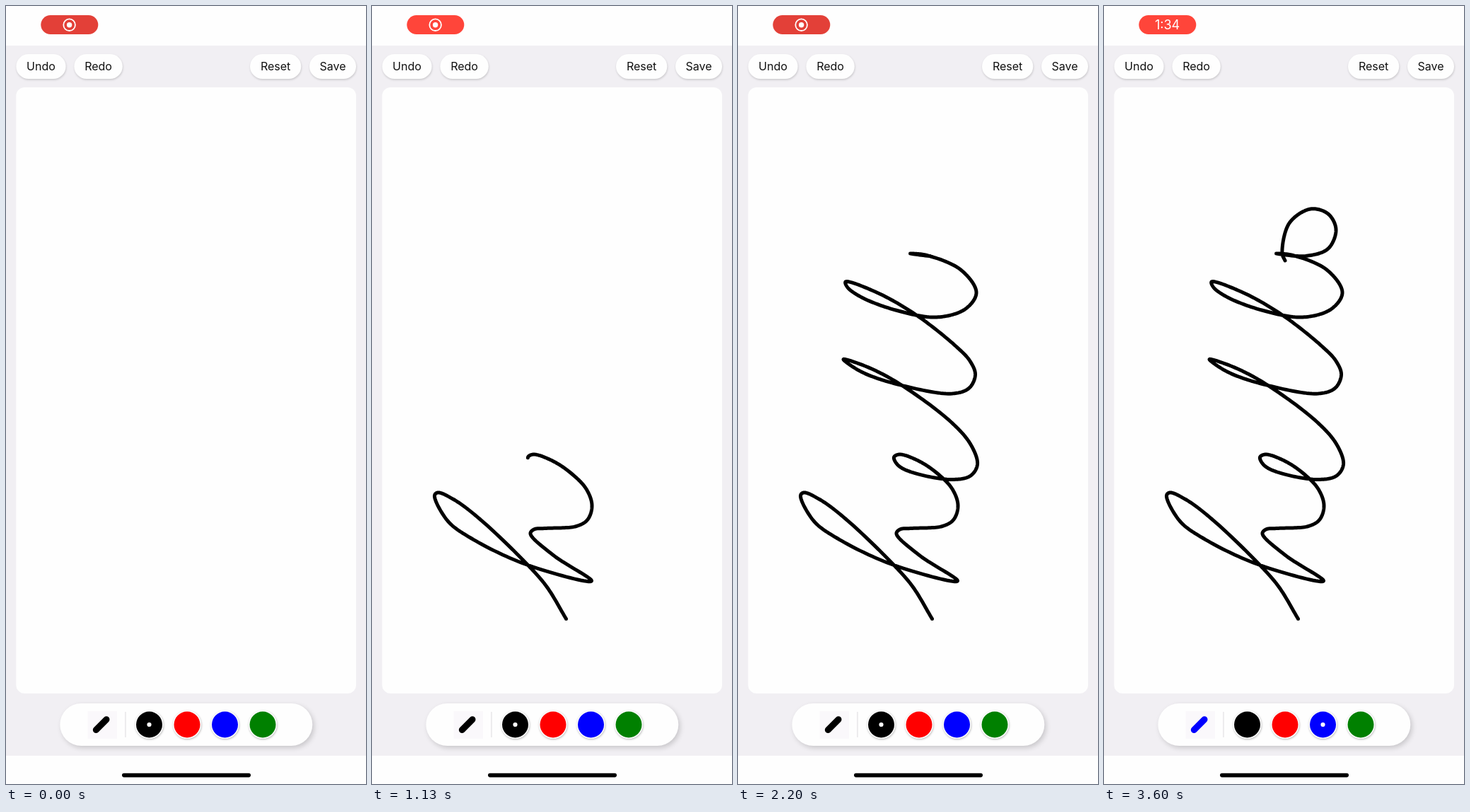
An HTML page with a canvas for the animation above (3.77 s loop, 509 by 1100 pixels).

```html
<!DOCTYPE html>
<html lang="en">
<head>
<meta charset="utf-8">
<title>Drawing pad</title>
<style>
  html, body { margin: 0; width: 100%; height: 100%; overflow: hidden; background: #fefefe; }
  canvas { display: block; width: 509px; height: 1100px; }
</style>
</head>
<body>
<canvas id="stage"></canvas>
<script>
const W = 509, H = 1100, LOOP = 3770;
const FONT = 'Inter, Roboto, sans-serif';
const canvas = document.getElementById('stage');
const ctx = canvas.getContext('2d');
const dpr = window.devicePixelRatio || 1;
canvas.width = W * dpr;
canvas.height = H * dpr;

// Pen positions per letter; a third value is the time the pen passes there.
const PEN_DOWN = 70;
const letterH = [
  [274.5, 866.5, 330], [247, 821], [219, 789], [152, 725], [116, 698], [93, 688],
  [88.5, 692], [107, 728], [141, 753, 600], [219, 790], [310.5, 813, 730],
  [257, 777], [224, 746, 835], [229, 740], [245, 738.5], [289, 735.5], [305, 726]
];
const letterE = [
  [311, 706], [303, 683], [282, 661], [255, 643], [228, 634], [220.5, 638, 1130],
  [226, 649], [245, 659], [303, 669.5], [329, 664]
];
const firstL = [
  [338.5, 648, 1300], [329, 620], [301, 588], [228, 534], [182, 510], [149, 499.5],
  [174, 517], [226, 535], [303, 548], [327, 540]
];
const secondL = [
  [335.5, 521], [328, 502], [308, 481], [250, 435.5], [194, 404], [152, 390],
  [155, 398], [175, 412], [223, 430], [281, 440, 1900]
];
const letterO = [
  [322, 428], [337, 405], [315, 373], [265, 352], [243.5, 350], [285, 353.5],
  [317, 343], [328, 316], [317, 294], [292, 287], [262, 307], [252, 350], [256, 360, 2510]
];
const PEN = [...letterH, ...letterE, ...firstL, ...secondL, ...letterO]
  .map(([x, y, t]) => ({ x, y, t }));

// Centripetal spline through the pen positions, timed by arc length.
function traceInk() {
  const n = PEN.length;
  const mirror = (a, b) => ({ x: 2 * a.x - b.x, y: 2 * a.y - b.y });
  const gap = (a, b) => Math.sqrt(Math.hypot(b.x - a.x, b.y - a.y));
  const ink = [PEN[0]];
  let part = [], len = 0, from = PEN[0].t;
  for (let i = 0; i < n - 1; i++) {
    const b = PEN[i], c = PEN[i + 1];
    const a = PEN[i - 1] || mirror(b, c), d = PEN[i + 2] || mirror(c, b);
    const ab = gap(a, b), bc = gap(b, c), cd = gap(c, d);
    const at = (k, u) => {
      const m1 = bc * ((b[k] - a[k]) / ab - (c[k] - a[k]) / (ab + bc)) + c[k] - b[k];
      const m2 = c[k] - b[k] + bc * ((d[k] - c[k]) / cd - (d[k] - b[k]) / (bc + cd));
      const s = c[k] - b[k];
      return b[k] + u * (m1 + u * (3 * s - 2 * m1 - m2 + u * (m1 + m2 - 2 * s)));
    };
    let last = b;
    for (let j = 1; j <= 20; j++) {
      const q = { x: at('x', j / 20), y: at('y', j / 20) };
      len += Math.hypot(q.x - last.x, q.y - last.y);
      q.len = len;
      part.push(q);
      last = q;
    }
    if (c.t) {
      for (const q of part) q.t = from + (c.t - from) * q.len / len;
      ink.push(...part);
      part = [];
      len = 0;
      from = c.t;
    }
  }
  return ink;
}
const INK = traceInk();

const ramp = (t, a, b) => {
  const u = Math.min(1, Math.max(0, (t - a) / (b - a)));
  return u * u * (3 - 2 * u);
};

function shadow(color, blur, dx, dy) {
  ctx.shadowColor = color;
  ctx.shadowBlur = blur * dpr;
  ctx.shadowOffsetX = dx * dpr;
  ctx.shadowOffsetY = dy * dpr;
}
const noShadow = () => shadow('transparent', 0, 0, 0);

function box(x, y, w, h, r, fill) {
  ctx.fillStyle = fill;
  ctx.beginPath();
  ctx.roundRect(x, y, w, h, r);
  ctx.fill();
}

function disc(x, y, r, fill) {
  ctx.fillStyle = fill;
  ctx.beginPath();
  ctx.arc(x, y, r, 0, Math.PI * 2);
  ctx.fill();
}

function line(x1, y1, x2, y2, width, color) {
  ctx.strokeStyle = color;
  ctx.lineWidth = width;
  ctx.beginPath();
  ctx.moveTo(x1, y1);
  ctx.lineTo(x2, y2);
  ctx.stroke();
}

function label(text, x, y, size, color) {
  ctx.font = `400 ${size}px ${FONT}`;
  ctx.fillStyle = color;
  ctx.fillText(text, x, y);
}

function button(text, x, w) {
  shadow('rgba(0,0,0,.17)', 3, 0.5, 1.5);
  box(x, 68, w, 35, 17.5, '#fefefe');
  noShadow();
  label(text, x + w / 2, 91.2, 16, '#111');
}

function recordPill(t) {
  const glow = ramp(t, 870, 1110) - ramp(t, 1880, 2220) + ramp(t, 3010, 3230);
  const tone = (a, b) => Math.round(a + (b - a) * glow);
  box(49.3, 13, 81, 27, 13.5, `rgb(${tone(227, 255)},${tone(64, 69)},${tone(56, 58)})`);
  const swap = ramp(t, 2490, 2900);
  ctx.globalAlpha = 1 - swap;
  ctx.strokeStyle = '#fff';
  ctx.lineWidth = 1.8;
  ctx.beginPath();
  ctx.arc(89.6, 26.7, 8.3, 0, Math.PI * 2);
  ctx.stroke();
  disc(89.6, 26.7, 3.7, '#fff');
  ctx.globalAlpha = swap;
  label('1:34', 89.6, 33, 18, '#fff');
  ctx.globalAlpha = 1;
}

function swatch(x, color, picked, alpha = 1) {
  shadow('rgba(0,0,0,.28)', 3, 0.5, 1);
  disc(x, 1016, 20, '#fefefe');
  noShadow();
  ctx.globalAlpha = alpha;
  disc(x, 1016, 18.5, color);
  ctx.globalAlpha = 1;
  if (picked) disc(x, 1016, 3.1, '#fff');
}

function toolbar(t) {
  const blue = t >= 3370;
  const press = 0.42 * (ramp(t, 3090, 3230) - ramp(t, 3340, 3600));
  shadow('rgba(0,0,0,.17)', 7, 2.5, 3);
  box(76.3, 986, 357, 60, 30, '#fefefe');
  noShadow();
  box(115.5, 997, 41.5, 39, 0, '#faf8fb');
  line(127.3, 1023.5, 142, 1008.8, 9, blue ? '#0000ff' : '#000');
  box(168, 998, 1.8, 36, 0, '#ebeaec');
  ['#000', '#ff0000', '#0000ff', '#008000'].forEach((color, i) =>
    swatch(202.5 + 53.5 * i, color, i === (blue ? 2 : 0), i === 2 ? 1 - press : 1));
}

function handwriting(t) {
  if (t < PEN_DOWN) return;
  const start = INK[0];
  ctx.strokeStyle = '#000';
  ctx.lineWidth = 5;
  ctx.beginPath();
  ctx.moveTo(start.x, start.y);
  ctx.lineTo(start.x + 0.01, start.y);
  for (let i = 1; i < INK.length; i++) {
    const a = INK[i - 1], b = INK[i];
    if (a.t >= t) break;
    const u = Math.min(1, (t - a.t) / (b.t - a.t));
    ctx.lineTo(a.x + (b.x - a.x) * u, a.y + (b.y - a.y) * u);
  }
  ctx.stroke();
}

function draw(t) {
  ctx.setTransform(dpr, 0, 0, dpr, 0, 0);
  ctx.lineCap = ctx.lineJoin = 'round';
  ctx.textAlign = 'center';
  box(0, 0, W, H, 0, '#fefefe');
  box(0, 56, W, 1004, 0, '#f1eff3');
  recordPill(t);
  button('Undo', 14.3, 70.3);
  button('Redo', 96.3, 68.5);
  button('Reset', 345, 72.3);
  button('Save', 429, 66);
  box(14.3, 115, 480.7, 857, 12, '#fefefe');
  handwriting(t);
  toolbar(t);
  box(164, 1084.8, 182, 5.6, 2.8, '#000');
}

const origin = performance.now();
function tick() {
  draw((performance.now() - origin) % LOOP);
  requestAnimationFrame(tick);
}
tick();
</script>
</body>
</html>
```
